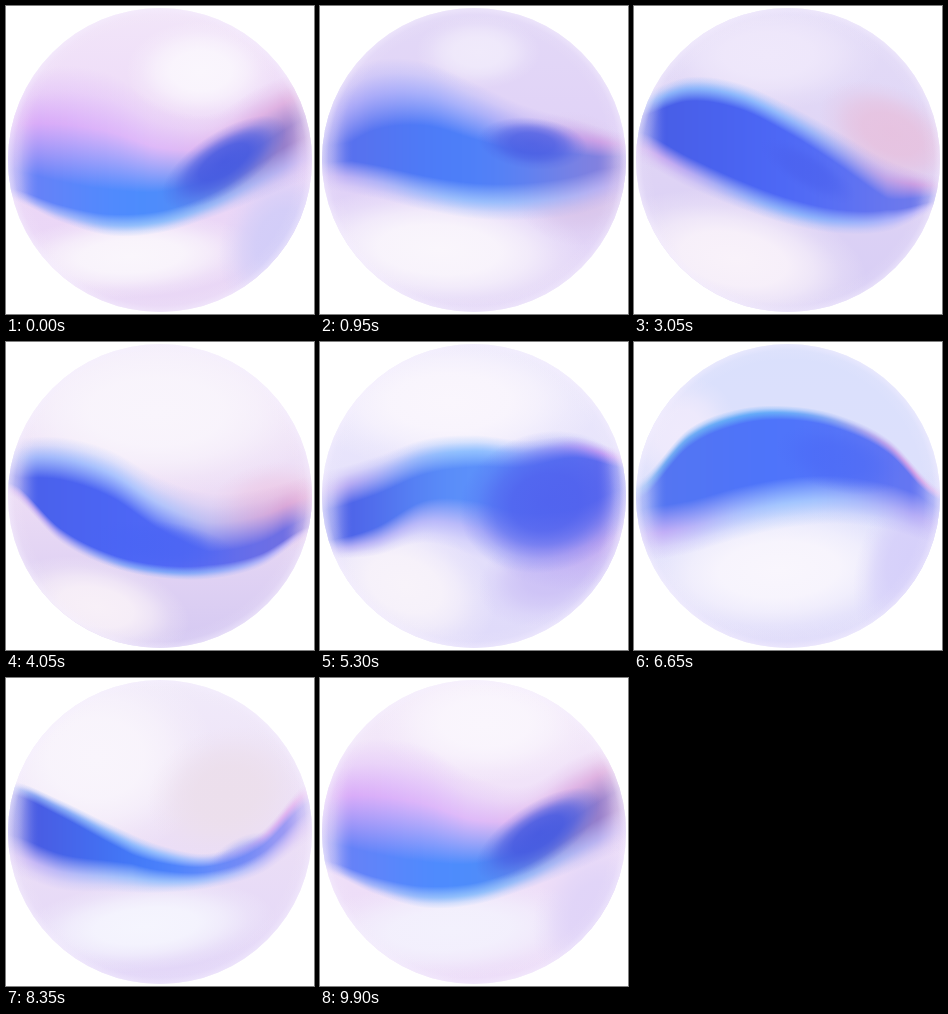
Write an HTML page with a canvas that moves like this. It is 308 by 308 pixels and loops after 10000 ms.

```html
<!DOCTYPE html>
<html lang="en">
<head>
<meta charset="utf-8">
<title>Orb</title>
<style>
html, body { margin: 0; width: 100%; height: 100%; overflow: hidden; background: #fff; }
canvas { display: block; width: 100vw; height: 100vh; }
</style>
</head>
<body>
<canvas id="orb" width="308" height="308"></canvas>
<script>
const SIZE = 308, LOOP = 10000, STEP = 50;
const ctx = document.getElementById('orb').getContext('2d');

// '#rrggbb' or '#rrggbbaa' to [r, g, b, a]
const hex = s => [1, 3, 5, 7].map(i => i < s.length ? parseInt(s.slice(i, i + 2), 16) / (i > 6 ? 255 : 1) : 1);
const hexes = s => s.split(' ').map(hex);
const rgba = (c, a = c[3]) => `rgba(${c[0].toFixed(1)},${c[1].toFixed(1)},${c[2].toFixed(1)},${Math.max(0, Math.min(1, a)).toFixed(3)})`;
const blob = (x, y, rx, ry, turn, color) => ({ box: [x, y, rx, ry, turn], color: hex(color) });

// top / bottom: ribbon edges from left to right; soft: depth of each edge at left, middle, right
const poses = [];
function pose(time, p) {
  for (const k of ['sky', 'core', 'rise', 'fall']) if (typeof p[k] === 'string') p[k] = hexes(p[k]);
  p.time = time;
  poses.push(p);
  return p;
}

const first = pose(0, {
  top: [72, 60, 68, 98, 108, 80, 62], bottom: [194, 216, 230, 227, 212, 193, 174],
  softTop: [130, 104, 48], softBottom: [16, 26, 44],
  sky: '#f2e6f9 #ecd6f7 #e9d8f6', core: '#6a80f6 #4f8cfa #a07cc4',
  rise: '#d4a0f8 #dcb4f8 #dca8d8', fall: '#a0a8f8 #80b8fc #b8a8ec',
  upper: blob(195, 65, 75, 50, 0, '#faf6fd'), side: blob(275, 235, 60, 80, 20, '#d2cdf8'),
  lower: blob(125, 250, 130, 42, -3, '#faf6fc'), spot: blob(218, 156, 72, 30, -33, '#4458e0f0')
});
pose(2100, {
  top: [82, 53, 50, 64, 97, 145, 184], bottom: [172, 172, 184, 203, 219, 225, 214],
  softTop: [22, 15, 14], softBottom: [45, 42, 34],
  sky: '#d8d0f6 #d6cef6 #dcd4f8', core: '#4a5ee2 #4f72f6 #7384f0',
  rise: '#78a4f6 #70a6fc #c486e6', fall: '#cfa6ee #93b8fd #b8aef8',
  upper: blob(125, 32, 62, 30, 0, '#e8e0fa'), side: blob(240, 118, 82, 50, 45, '#deb8dae6'),
  lower: blob(110, 240, 165, 78, 10, '#faf5fc'), spot: blob(202, 128, 42, 22, 40, '#4a5ce6b0')
});
pose(4050, {
  top: [96, 95, 108, 136, 151, 147, 134], bottom: [154, 200, 225, 236, 237, 225, 194],
  softTop: [40, 52, 74], softBottom: [14, 13, 18],
  sky: '#f4eefb #ecdcf5 #d4c8f2', core: '#4a60ea #5068f5 #7470e0',
  rise: '#90acfa #a8c0fc #dc9cd0', fall: '#c0a0f0 #70a0fa #c0b0f8',
  upper: blob(150, 70, 170, 85, 0, '#f9f5fc'), side: blob(275, 165, 70, 45, 0, '#ecc4e2b0'),
  lower: blob(90, 265, 95, 48, 12, '#f8f0f8'), spot: blob(155, 203, 75, 24, 8, '#4964f4a0')
});
pose(5300, {
  top: [128, 115, 97, 93, 98, 94, 108], bottom: [217, 214, 201, 215, 240, 248, 236],
  softTop: [40, 32, 18], softBottom: [18, 56, 90],
  sky: '#ece9fc #e6e2fb #dfdafa', core: '#4c5ee6 #5c90fa #6068ec',
  rise: '#b49cf0 #80b8ff #d090f0', fall: '#b0a8f4 #b4b4fa #bc9cee',
  upper: blob(130, 60, 150, 70, 0, '#faf6fd'), side: blob(235, 230, 80, 50, -20, '#cdc2f6'),
  lower: blob(85, 243, 95, 64, 25, '#f8f3fa'), spot: blob(226, 160, 88, 70, -15, '#4f60eee0')
});
pose(6650, {
  top: [138, 87, 67, 64, 73, 97, 145], bottom: [220, 212, 197, 186, 182, 188, 202],
  softTop: [20, 14, 15], softBottom: [54, 50, 44],
  sky: '#dae0fc #dde0fc #e0dcfa', core: '#5575f0 #4f74fa #6876f0',
  rise: '#60a0f0 #58a0f8 #e090e0', fall: '#c0a0f4 #98c0ff #b0a0f4',
  upper: blob(45, 90, 60, 50, -40, '#efeafc'), side: blob(275, 215, 50, 90, 20, '#d6d0fa'),
  lower: blob(145, 228, 150, 70, -3, '#f9f6fd'), spot: blob(205, 118, 65, 32, 15, '#4a68f690')
});
pose(8350, {
  top: [102, 122, 146, 167, 175, 154, 102], bottom: [197, 212, 214, 215, 210, 196, 164],
  softTop: [14, 22, 24], softBottom: [40, 28, 34],
  sky: '#f1ebfa #ecdff6 #e2d6f8', core: '#4a58e0 #4a80fa #a69cf2',
  rise: '#7090f0 #88b8ff #e8a8ec', fall: '#c4aef4 #92befd #d2bcf6',
  upper: blob(90, 80, 120, 100, 0, '#f9f5fc'), side: blob(220, 115, 80, 65, -20, '#ecdfec'),
  lower: blob(140, 248, 130, 45, -5, '#f5f5fe'), spot: blob(235, 176, 36, 16, -28, '#5c78f450')
});
pose(9900, {
  ...first,
  sky: '#f4ecfa #efdff8 #ecdcf8',
  upper: blob(165, 45, 110, 60, 0, '#faf6fd'), side: blob(275, 235, 60, 80, 20, '#e0d4f8'),
  lower: blob(130, 252, 150, 50, -3, '#f3f1fd')
});

const hermite = (a, b, ma, mb, u) => {
  const v = u * u, w = v * u;
  return a * (2 * w - 3 * v + 1) + ma * (w - 2 * v + u) + b * (3 * v - 2 * w) + mb * (w - v);
};

// smooth curve through evenly spaced values, u in 0..1
function along(list, u) {
  const n = list.length - 1, i = Math.min(n - 1, Math.floor(u * n));
  const at = k => list[Math.max(0, Math.min(n, k))];
  return hermite(at(i), at(i + 1), (at(i + 1) - at(i - 1)) / 2, (at(i + 2) - at(i)) / 2, u * n - i);
}
const colorAlong = (list, u) => [0, 1, 2, 3].map(k => along(list.map(c => c[k]), u));

function mix(p, a, b, n, t, u) {
  if (typeof a === 'number') {
    const span = t[2] - t[1];
    return hermite(a, b, (b - p) / (t[2] - t[0]) * span, (n - a) / (t[3] - t[1]) * span, u);
  }
  if (Array.isArray(a)) return a.map((v, i) => mix(p[i], v, b[i], n[i], t, u));
  const out = {};
  for (const k in a) out[k] = mix(p[k], a[k], b[k], n[k], t, u);
  return out;
}

function poseAt(time) {
  const last = poses.length - 1, now = Math.min(time, poses[last].time);
  let i = 0;
  while (i < last - 1 && now >= poses[i + 1].time) i++;
  const four = [Math.max(0, i - 1), i, i + 1, Math.min(last, i + 2)].map(k => poses[k]);
  const t = four.map(p => p.time);
  return mix(...four, t, (now - t[1]) / (t[2] - t[1]));
}

function drawBlob({ box: [x, y, rx, ry, turn], color }) {
  const g = ctx.createRadialGradient(0, 0, 0, 0, 0, 1);
  [[0, 1], [0.4, 0.92], [0.6, 0.66], [0.8, 0.25], [1, 0]].forEach(([at, a]) => g.addColorStop(at, rgba(color, color[3] * a)));
  ctx.save();
  ctx.translate(x, y);
  ctx.rotate(turn * Math.PI / 180);
  ctx.scale(rx, ry);
  ctx.fillStyle = g;
  ctx.fillRect(-1, -1, 2, 2);
  ctx.restore();
}

// the ribbon turns translucent where it meets the side of the orb
function endFade(x) {
  const d = Math.max(0, Math.min(1, (Math.min(x, SIZE - x) - 3) / 30));
  return 0.35 + 0.65 * d * d * (3 - 2 * d);
}

function drawRibbon(p) {
  for (let x = 0; x < SIZE; x++) {
    const u = Math.max(0, Math.min(1, (x - 4) / 300));
    const top = along(p.top, u), h = Math.max(2, along(p.bottom, u) - top);
    let a = Math.max(1, along(p.softTop, u)), b = Math.max(1, along(p.softBottom, u));
    const fit = Math.min(1, 0.85 * h / (a + b));
    a *= fit / h;
    b *= fit / h;
    const core = colorAlong(p.core, u), rise = colorAlong(p.rise, u), fall = colorAlong(p.fall, u);
    const g = ctx.createLinearGradient(0, top, 0, top + h);
    const stop = (at, c, alpha) => g.addColorStop(Math.max(0, Math.min(1, at)), rgba(c, alpha));
    stop(0, rise, 0);
    stop(a * 0.22, rise, 0.28);
    stop(a * 0.5, rise, 0.85);
    stop(a, core, 1);
    stop(1 - b, core, 1);
    stop(1 - b * 0.5, fall, 0.85);
    stop(1 - b * 0.22, fall, 0.28);
    stop(1, fall, 0);
    ctx.globalAlpha = endFade(x);
    ctx.fillStyle = g;
    ctx.fillRect(x, top, 1, h);
  }
  ctx.globalAlpha = 1;
}

function drawRim() {
  const g = ctx.createRadialGradient(154, 154, 136, 154, 154, 152);
  g.addColorStop(0, 'rgba(246,240,255,0)');
  g.addColorStop(0.6, 'rgba(246,240,255,.1)');
  g.addColorStop(1, 'rgba(246,240,255,.5)');
  ctx.fillStyle = g;
  ctx.fillRect(0, 0, SIZE, SIZE);
}

function draw(time) {
  const p = poseAt(time);
  ctx.fillStyle = '#fff';
  ctx.fillRect(0, 0, SIZE, SIZE);
  ctx.save();
  ctx.beginPath();
  ctx.arc(154, 154, 152, 0, Math.PI * 2);
  ctx.clip();
  const sky = ctx.createLinearGradient(0, 0, 0, SIZE);
  p.sky.forEach((c, i) => sky.addColorStop(i / 2, rgba(c)));
  ctx.fillStyle = sky;
  ctx.fillRect(0, 0, SIZE, SIZE);
  [p.upper, p.lower, p.side].forEach(drawBlob);
  drawRibbon(p);
  drawBlob(p.spot);
  drawRim();
  ctx.restore();
}

const start = performance.now();
let shown = -1;
function tick() {
  const time = Math.floor((performance.now() - start) % LOOP / STEP) * STEP;
  if (time !== shown) draw(shown = time);
  requestAnimationFrame(tick);
}
tick();
</script>
</body>
</html>
```
